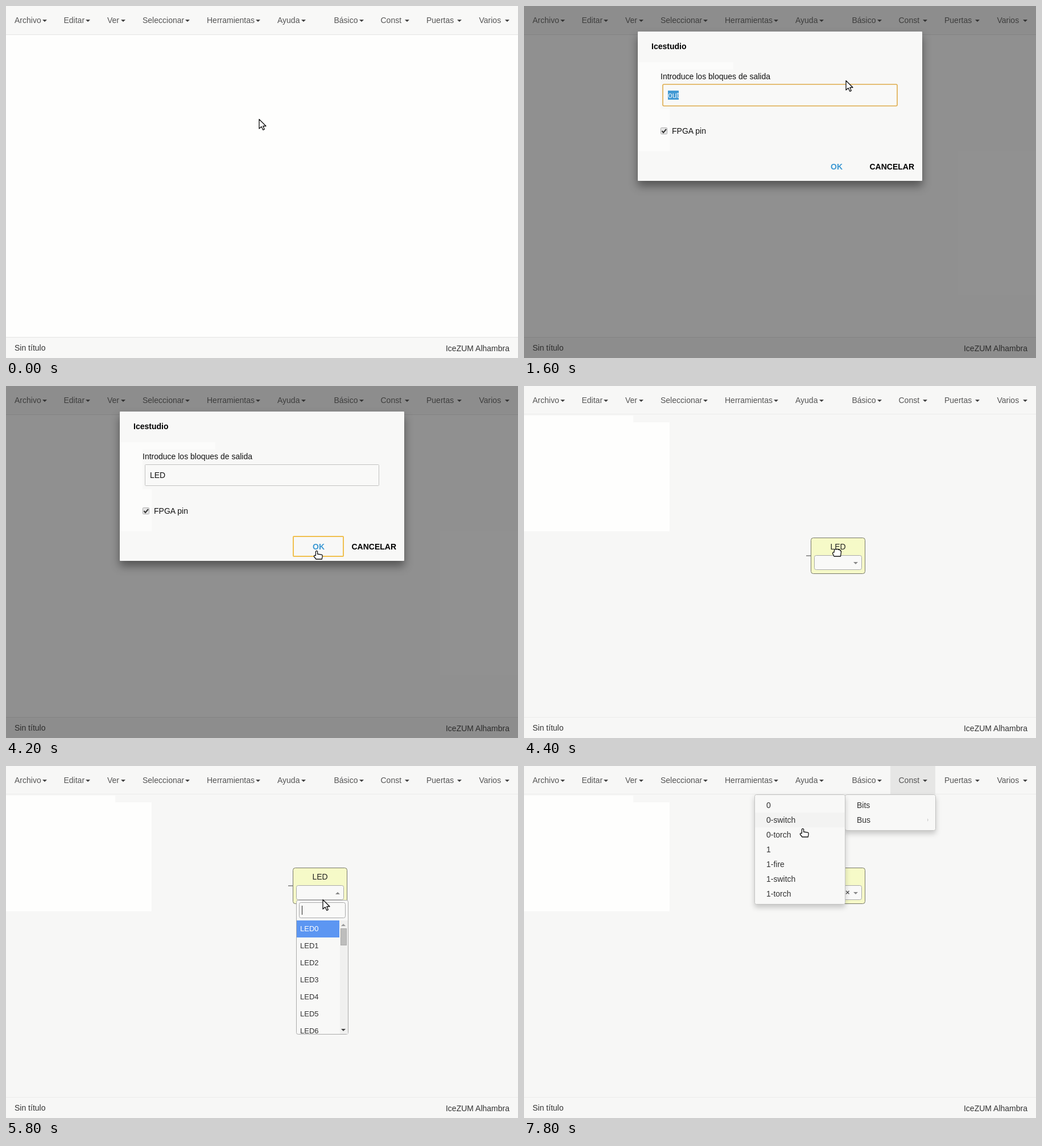
These frames come from a looping animation (900 by 620 pixels, 8 s). An HTML page:

```html
<!DOCTYPE html>
<html lang="es">
<head>
<meta charset="utf-8">
<style>
html, body { margin: 0; width: 100%; height: 100%; overflow: hidden; background: #fefefd; }
svg { display: block; width: 900px; height: 620px; }
text { font: 14px "Liberation Sans", Arial, sans-serif; white-space: pre; }
.bold { font-weight: bold; }
.small { font-size: 13px; }
.menu { filter: drop-shadow(0 5px 5px rgba(0,0,0,.2)); }
.dialog { filter: drop-shadow(0 9px 8px rgba(0,0,0,.42)); }
</style>
</head>
<body>
<svg id="stage" viewBox="0 0 900 620"></svg>
<script>
const STEP = 200, LOOP = 8000;
const stage = document.getElementById('stage');

const rect = (x, y, w, h, fill, extra = '') =>
  `<rect x="${x}" y="${y}" width="${w}" height="${h}" fill="${fill}" ${extra}/>`;
const box = (x, y, w, h, fill, stroke, rx = 3, width = 1) =>
  rect(x + .5, y + .5, w - 1, h - 1, fill, `rx="${rx}" stroke="${stroke}" stroke-width="${width}"`);
const text = (x, y, str, fill = '#333', extra = '') =>
  `<text x="${x}" y="${y}" fill="${fill}" ${extra}>${str}</text>`;
const path = (d, fill, extra = '') => `<path d="${d}" fill="${fill}" ${extra}/>`;
const caret = (x, y, fill, dir = 1) =>
  path(`M${x - 4} ${dir > 0 ? y : y + 4}h8l-4 ${4 * dir}z`, fill);

// label, text x, caret centre
const NAV = [
  ['Archivo', 15, 68], ['Editar', 101.5, 144], ['Ver', 178, 206],
  ['Seleccionar', 240, 319], ['Herramientas', 353, 443], ['Ayuda', 477, 523],
  ['Básico', 576.5, 625], ['Const', 658.5, 705], ['Puertas', 739, 797], ['Varios', 831.5, 881]
];
const BASIC = [
  ['Entrada', '#ecec74'], ['Salida', '#ecec74'], ['Constante', '#efe07c'],
  ['Código', '#b5dfe6'], ['Información', '#d6d6d6']
];
const BITS = ['0', '0-switch', '0-torch', '1', '1-fire', '1-switch', '1-torch'];

// step, x, y of the pointer tip
const POINTER = [
  [0, 445, 199], [1, 490, 168], [2, 560, 95], [3, 598, 30], [4, 600, 30], [5, 597, 72],
  [6, 585, 93], [7, 582, 97], [8, 566, 131], [15, 566, 131], [19, 552, 262], [21, 546, 290],
  [22, 550, 294], [23, 550, 262], [24, 550, 230], [25, 550, 206], [26, 550, 206],
  [28, 557, 231], [29, 557, 235], [32, 547, 284], [33, 552, 278], [35, 668, 32],
  [36, 676, 28], [37, 630, 64], [38, 530, 82], [39, 490, 110]
];

function pointerAt(step) {
  let i = 0;
  while (i < POINTER.length - 2 && POINTER[i + 1][0] <= step) i++;
  const [s0, x0, y0] = POINTER[i], [s1, x1, y1] = POINTER[i + 1];
  const k = Math.min(1, (step - s0) / (s1 - s0));
  return [x0 + (x1 - x0) * k, y0 + (y1 - y0) * k];
}

const SHAPES = {
  arrow: 'M0 .5V17L4 13.5L6.8 19.3L9.3 18.2L6.8 12.5H12Z',
  hand: 'M-1.6 8.5V1.5Q0-.8 1.6 1.5V6L9 7.2Q10.3 7.7 10.2 9.5L9.3 15H-1L-4.5 10.5Q-5 8.2-3 8.5Z',
  grab: 'M-4.5-5Q-3-7.5-1-6Q1-7.5 3-5.5Q5-6.5 5.5-4.5Q7.8-4 7.5-1.5L6.5 6H-5L-7.5 1Q-7.5-1.5-5-1Z'
};

function pointer(step) {
  const kind = (step >= 22 && step <= 26) ? 'grab'
    : (step >= 3 && step <= 7) || step === 20 || step === 21 || step >= 35 ? 'hand' : 'arrow';
  const [x, y] = pointerAt(step);
  return `<g transform="translate(${x} ${y})">` +
    path(SHAPES[kind], '#fff', 'stroke="#111" stroke-width="1.3" stroke-linejoin="round"') + '</g>';
}

function chrome(active, late) {
  const bar = late ? '#f7f7f6' : '#f8f8f7', line = late ? '#ececeb' : '#e4e4e3';
  let out = rect(0, 0, 900, 620, late ? '#f7f7f6' : '#fefefd');
  if (late) out += path('M0 52H192V64H256V256H0Z', '#fefefd');
  out += rect(0, 0, 900, 50, bar) + rect(0, late ? 49 : 50, 900, 1, line) +
    rect(0, 583, 900, 37, bar) + rect(0, 583, 900, 1, line);
  if (active === 'Básico') out += rect(562, 0, 82, 50, '#e6e6e5');
  if (active === 'Const') out += rect(644, 0, 79, 50, '#e6e6e5');
  for (const [label, x, cx] of NAV) out += text(x, 30, label, '#555') + caret(cx, 24, '#444');
  return out + text(15, 607, 'Sin título') + text(885, 608, 'IceZUM Alhambra', '#333', 'text-anchor="end"');
}

const panel = (x, w, h, fill) => `<g class="menu">${box(x, 50, w, h, fill, '#c4c4c3')}</g>`;

function basicMenu(hover) {
  let out = panel(484, 160, 142, '#fdfdfc');
  if (hover >= 0) out += rect(485, 83 + (hover - 1) * 26, 158, 26, '#f4f4f3');
  BASIC.forEach(([label, color], i) => {
    out += rect(505.5, 67.5 + i * 26, 6, 5, color, 'rx="1.5"') + text(524, 74 + i * 26, label);
  });
  return out;
}

function constMenu(step) {
  let out = panel(564, 160, 64, '#f8f8f7') + text(585, 74, 'Bits') + text(585, 100, 'Bus') +
    path('M709 92l2 3l-2 3z', '#d0d0d0');
  if (step < 37) return out;
  out += panel(405, 160, 194, '#f8f8f7');
  if (step > 37) out += rect(406, 82, 158, 26, '#f3f3f2');
  BITS.forEach((label, i) => { out += text(426, 74 + i * 26, label); });
  return out;
}

function dialog(step) {
  const okFocus = step >= 21;
  const value = ['L', 'LE', 'LED'][Math.min(2, step - 12)];
  let out = rect(0, 0, 900, 620, 'rgba(37,37,37,.5)') +
    `<g class="dialog">${rect(200, 45, 500, 263, '#f8f8f7', 'rx="1"')}</g>` +
    path('M200 99H368V112H240V182H256V256H200Z', '#fcfcfb') +
    text(224, 76, 'Icestudio', '#000', 'class="bold"') +
    text(240, 129, 'Introduce los bloques de salida', '#111') +
    (okFocus ? box(244, 138, 412, 38, '#f9f9f8', '#c2c2c1', 1)
             : box(243.5, 137.5, 413, 39, '#f9f9f8', '#dfac4b', 2, 1.6));
  if (step < 12) out += rect(253, 149, 19, 16, '#4199d3') + text(253, 162, 'out', '#e4f1fa');
  else out += text(253, 162, value, '#111');
  out += box(240, 214, 12, 12, '#e6e6e6', '#aaa', 1) +
    path('M242.5 220l2.5 3l5-6', 'none', 'stroke="#333" stroke-width="2"') +
    text(260, 225, 'FPGA pin', '#111');
  if (okFocus) out += box(504.5, 264.5, 89, 36, 'none', '#f0c04f', 1, 2);
  return out + text(539, 288, 'OK', '#3c98d3', 'class="bold"') +
    text(607.5, 288, 'CANCELAR', '#000', 'class="bold"');
}

function block(y, open, chosen) {
  let out = rect(496, y + 31, 8, 2, '#999') + box(504, y, 96, 64, '#f6fac8', '#77776a', 4) +
    text(552, y + 21, 'LED', '#222', 'text-anchor="middle"') +
    box(510, y + 31, 84, 26, '#f9f9f8', '#aaa') + caret(583, y + 43, '#888', open ? -1 : 1);
  if (chosen) out += text(517, y + 49, 'LED0', '#444', 'class="small"') +
    text(565, y + 48, '×', '#555', 'class="small bold"');
  return out;
}

function dropdown() {
  let out = box(510, 236, 92, 237, '#f8f8f7', '#aaa') + box(515, 240, 82, 28, '#f9f9f8', '#aaa') +
    rect(520, 246, 1, 16, '#222') + rect(511, 272, 75, 30, '#5c96f2') +
    '<clipPath id="list"><rect x="511" y="272" width="76" height="200"/></clipPath><g clip-path="url(#list)">';
  for (let i = 0; i < 7; i++)
    out += text(517, 291 + i * 30, 'LED' + i, i ? '#333' : '#fff', 'class="small"');
  return out + '</g>' + rect(587, 272, 14, 200, '#f0f0ef') + caret(593, 278, '#999', -1) +
    box(588, 286, 11, 30, '#bdbdbc', '#aaa', 0) + caret(593, 463, '#444');
}

function scene(step) {
  const basicOpen = step >= 4 && step <= 6;
  const constOpen = step >= 36;
  const active = step >= 3 && step <= 6 ? 'Básico' : step >= 35 ? 'Const' : '';
  let out = chrome(active, step >= 22);
  if (basicOpen) out += basicMenu(step === 6 ? 1 : step === 5 ? 0 : -1);
  if (step >= 7 && step <= 21) out += dialog(step);
  if (step >= 22) {
    const open = step >= 29 && step <= 32;
    out += block(Math.max(179, 267 - (step - 22) * 32), open, step >= 33);
    if (open) out += dropdown();
  }
  if (constOpen) out += constMenu(step);
  return out + pointer(step);
}

let shown = -1;
const start = performance.now();
function frame() {
  const step = Math.floor(((performance.now() - start) % LOOP) / STEP);
  if (step !== shown) {
    shown = step;
    stage.innerHTML = scene(step);
  }
  requestAnimationFrame(frame);
}
frame();
</script>
</body>
</html>
```
